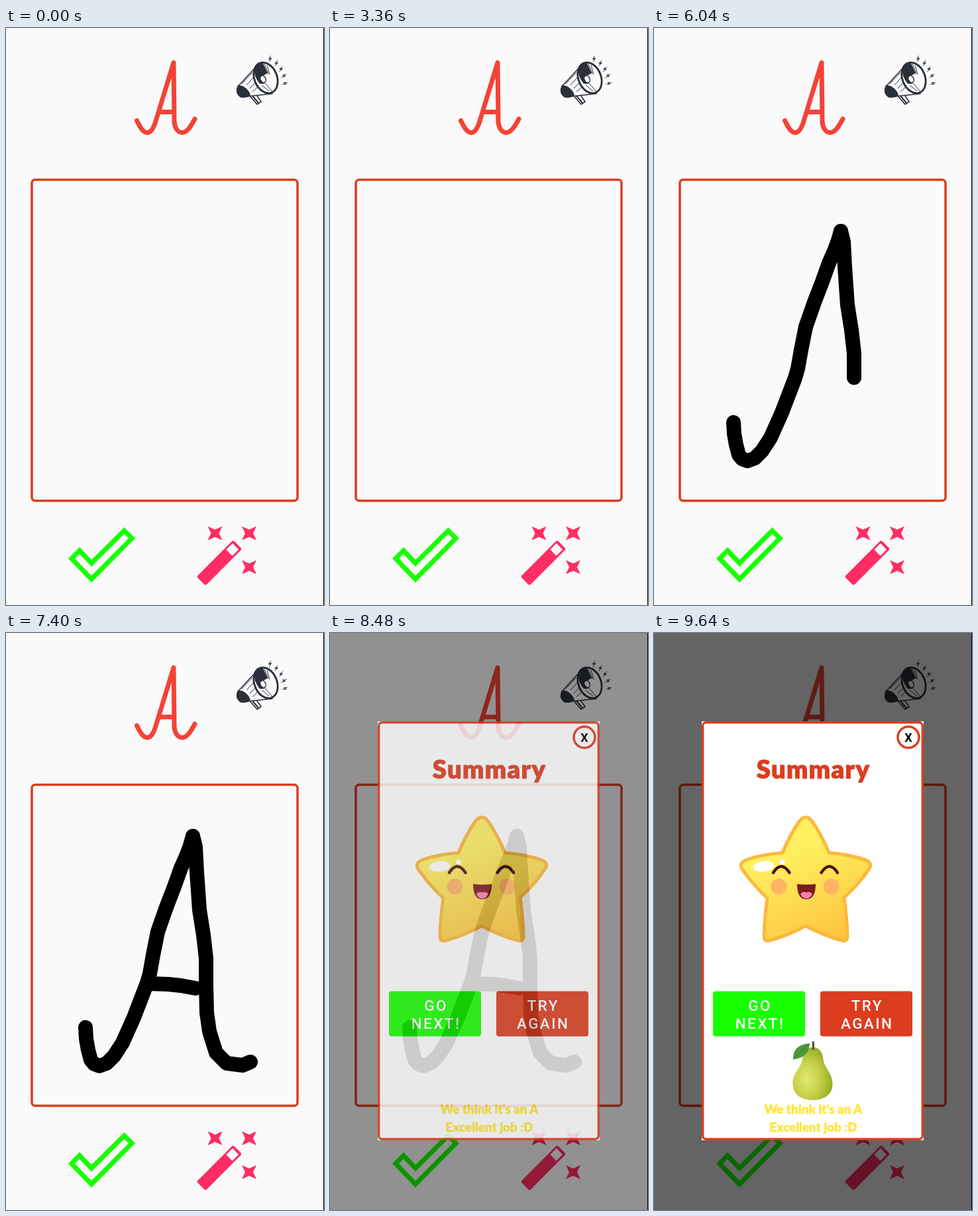
Write an HTML page that moves like this. It is 480 by 869 pixels and loops after 10000 ms.

```html
<!DOCTYPE html>
<html lang="en">
<head>
<meta charset="utf-8">
<title>Letter practice</title>
<style>
  html, body { margin: 0; width: 100%; height: 100%; overflow: hidden; background: #fafafa; }
  svg { display: block; width: 100%; height: 100%; }

  /* Every animation shares one 10 s loop, so 1% is 100 ms. */
  .ink path, .press, .shade, .dialog, .pear { animation: 10s linear infinite both; }
  .ink path {
    fill: none; stroke: #000; stroke-width: 22;
    stroke-linecap: round; stroke-linejoin: round; stroke-dasharray: 1 1.1;
  }
  .ink .bowl { animation-name: bowl; }
  .ink .tail { animation-name: tail; }
  .ink .rise { animation-name: rise; }
  .ink .fall { animation-name: fall; }
  .ink .bar { animation-name: bar; }
  .press.wand { animation-name: press-wand; }
  .press.check { animation-name: press-check; }
  .shade { animation-name: shade; }
  .dialog { animation-name: dialog; }
  .pear { animation-name: pear; }

  @keyframes bowl {
    0%, 7.19% { opacity: 0; stroke-dashoffset: 1; }
    7.2% { opacity: 1; stroke-dashoffset: .96; }
    15.6%, 33.59% { opacity: 1; stroke-dashoffset: 0; }
    33.6%, 100% { opacity: 0; stroke-dashoffset: 0; }
  }
  @keyframes tail {
    0%, 20.79% { opacity: 0; stroke-dashoffset: 1; }
    20.8% { opacity: 1; stroke-dashoffset: .95; }
    24.4%, 33.59% { opacity: 1; stroke-dashoffset: 0; }
    33.6%, 100% { opacity: 0; stroke-dashoffset: 0; }
  }
  @keyframes rise {
    0%, 45.59% { opacity: 0; stroke-dashoffset: 1; }
    45.6% { opacity: 1; stroke-dashoffset: .99; }
    50.4%, 50.79% { opacity: 1; stroke-dashoffset: .52; }
    55.6%, 100% { opacity: 1; stroke-dashoffset: 0; }
  }
  @keyframes fall {
    0%, 56.39% { opacity: 0; stroke-dashoffset: 1; }
    56.4% { opacity: 1; stroke-dashoffset: .97; }
    63.6%, 100% { opacity: 1; stroke-dashoffset: 0; }
  }
  @keyframes bar {
    0%, 69.99% { opacity: 0; stroke-dashoffset: 1; }
    70% { opacity: 1; stroke-dashoffset: .95; }
    74%, 100% { opacity: 1; stroke-dashoffset: 0; }
  }
  @keyframes press-wand {
    0%, 32.39% { opacity: 0; }
    32.4%, 33.59% { opacity: .05; }
    33.6%, 100% { opacity: 0; }
  }
  @keyframes press-check {
    0%, 79.59% { opacity: 0; }
    79.6%, 82.39% { opacity: .05; }
    82.4%, 100% { opacity: 0; }
  }
  @keyframes shade {
    0%, 83.99% { opacity: 0; }
    84%, 84.3% { opacity: .14; }
    84.8% { opacity: .42; }
    85.4%, 100% { opacity: .6; }
  }
  @keyframes dialog {
    0%, 83.99% { opacity: 0; }
    84%, 84.3% { opacity: .41; }
    84.8% { opacity: .8; }
    85.4%, 100% { opacity: 1; }
  }
  @keyframes pear {
    0%, 85.3% { opacity: 0; }
    85.6%, 85.9% { opacity: .07; }
    88%, 100% { opacity: 1; }
  }

  text { text-anchor: middle; }
  .fun { font-family: Lato, "Open Sans", sans-serif; font-weight: 900; stroke-linejoin: round; }
  .title { font-size: 38px; letter-spacing: 1.4px; fill: #dc3d1e; stroke: #dc3d1e; }
  .praise { font-size: 18.8px; fill: #ffe63c; stroke: #ffe63c; stroke-width: .4; }
  .label { font: 500 22.5px Roboto, sans-serif; letter-spacing: 2.4px; fill: #fff; }
  .close { font: 700 18px Roboto, sans-serif; }
</style>
</head>
<body>
<svg viewBox="0 0 480 869" preserveAspectRatio="none">
  <defs>
    <linearGradient id="gold" x1=".3" y1="0" x2=".75" y2="1">
      <stop offset=".25" stop-color="#fff062"/>
      <stop offset="1" stop-color="#fdc43c"/>
    </linearGradient>
    <radialGradient id="skin" cx=".35" cy=".6" r=".7">
      <stop offset="0" stop-color="#e3e86f"/>
      <stop offset=".5" stop-color="#c3d048"/>
      <stop offset="1" stop-color="#8ea51c"/>
    </radialGradient>
    <path id="spark" d="M-11-10.5L0-5.5 11-10.5 6 0 11 10.5 0 5.5-11 10.5-6 0Z"/>
    <path id="bolt" d="M2-6L-3 1 0 .5-2 6 3-1.500 0-1Z"/>
  </defs>

  <rect width="480" height="869" fill="#fafafa"/>

  <!-- model letter -->
  <path d="M197.500 139.500C202 149 207 157.500 213 157.500C220 157.500 224 148 227 137L253 52L254 141C254.500 150 259 157.500 266 157.500C274 157.500 280 146 285 137M232 126.500H254"
    fill="none" stroke="#f44336" stroke-width="7" stroke-linecap="round" stroke-linejoin="round"/>

  <!-- megaphone -->
  <g fill="#2a303a" stroke="#2a303a" stroke-linejoin="round">
    <path d="M367 101L379 115 385 111 376 98Z" fill="#fafafa" stroke-width="1.600"/>
    <path d="M371 101L381 113" fill="none" stroke-width="2"/>
    <path d="M375 61L350 88Q346 98 354 104L402 99Z" fill="#fafafa" stroke-width="1.500"/>
    <path d="M350 87Q357 86 363 92T368 102Q358 107 352 102T350 87Z" stroke-width="1"/>
    <path d="M372 67L356 84M373 75L363 86M376 83L368 91M380 89L372 96" fill="none" stroke-width="1"/>
    <ellipse cx="392" cy="75" rx="17" ry="24" transform="rotate(-22 392 75)" fill="#fafafa" stroke-width="2.800"/>
    <path d="M375 59Q379 52 388 53L395 68 386 73 390 84 383 84Q373 72 375 59Z" stroke="none"/>
    <path d="M390 54L396 69M394 56L398 70M386 86L397 95M391 83L402 96" fill="none" stroke-width="1"/>
    <ellipse cx="388" cy="77" rx="4" ry="5.500" transform="rotate(-25 388 77)" fill="#fafafa" stroke-width="1.500"/>
    <g stroke="none">
      <use href="#bolt" x="398.500" y="46.500"/>
      <use href="#bolt" transform="translate(408 53) rotate(15)"/>
      <use href="#bolt" transform="translate(415 62) rotate(20)"/>
      <use href="#bolt" transform="translate(419.500 72) rotate(45)"/>
      <use href="#bolt" transform="translate(421 83.500) rotate(65)"/>
    </g>
  </g>

  <rect x="39" y="228.500" width="401" height="483.500" rx="5" fill="none" stroke="#dc3d1e" stroke-width="3.500"/>

  <!-- buttons -->
  <path d="M99 799L111 787 129 806 178.500 757 190 768.500 129 830Z" fill="none" stroke="#18ff00" stroke-width="7.200"/>
  <g fill="#ff2d62">
    <rect x="-39" y="-9.500" width="78" height="19" rx="3" transform="translate(322 805.500) rotate(-45)"/>
    <path d="M332.500 785.500L342 776 351 785.500 341.500 795Z" fill="#fafafa"/>
    <use href="#spark" x="315.500" y="761"/>
    <use href="#spark" x="367" y="761"/>
    <use href="#spark" x="367" y="812"/>
  </g>
  <circle class="press check" cx="145" cy="793" r="53"/>
  <circle class="press wand" cx="333" cy="791" r="53"/>

  <!-- handwriting -->
  <g class="ink">
    <path class="bowl" pathLength="1" d="M253 425L238 414 222 412 205 416 187 428 175 447 170 467 169 486 177 512 187 525 205 539 222 545 242 546.500 262 543 284 527 294 509 305 487 305 467 301 453 288 432 275 421 262 419 252 423 235 426 222 434"/>
    <path class="tail" pathLength="1" d="M305 431L306 455 307 485 310 515 317 537 328 549 343 555 360 554"/>
    <path class="rise" pathLength="1" d="M120 594L121 611 124 628 128 643 133 649 141 652 152 648 163 637 176 617 193 579 213 527 217 513 222 485 229 450 242 413 254 382 264 354 272 336 278 320 282 306"/>
    <path class="fall" pathLength="1" d="M282 306L286 322 288 360 292 417 298 455 302 490 302 530 303 572 307 600 317 632 333 648 357 651 369 646"/>
    <path class="bar" pathLength="1" d="M216 528L245 529 264 531 286 535"/>
  </g>

  <rect class="shade" width="480" height="869"/>

  <g class="dialog">
    <rect x="72" y="133" width="335" height="631" fill="#fff"/>
    <rect x="73.700" y="134.700" width="331.600" height="627.600" rx="5" fill="none" stroke="#dc3d1e" stroke-width="3.400"/>
    <circle cx="384" cy="157" r="16" fill="#fff" stroke="#dc3d1e" stroke-width="3.500"/>
    <text class="close" x="384" y="163.500">X</text>
    <text class="fun title" x="240.500" y="219">Summary</text>

    <!-- star -->
    <path d="M219 284Q229 271 239 284Q254 306 264 331Q292 333 317 341Q332 346 324 356Q308 380 287 398Q291 426 292 456Q292 466 283 463Q254 455 229 441Q204 455 175 463Q166 466 166 456Q167 426 171 399Q150 380 134 357Q126 346 141 341Q166 333 194 331Q204 306 219 284Z"
      fill="url(#gold)" stroke="#fdb83c" stroke-width="5" stroke-linejoin="round"/>
    <g fill="#fff">
      <ellipse cx="165.500" cy="351.500" rx="16" ry="8" transform="rotate(-6 165 351)"/>
      <circle cx="194" cy="345" r="4"/>
    </g>
    <path d="M180 361Q192 342 204.500 361M252.500 361Q265 342 277 361" fill="none" stroke="#4b1411" stroke-width="4.500" stroke-linecap="round"/>
    <g fill="#ffb463">
      <circle cx="188.500" cy="382" r="12"/>
      <circle cx="268" cy="382" r="12"/>
    </g>
    <path d="M216 378Q230 380 244 378Q244 401 230 401T216 378Z" fill="#7a1b22"/>
    <path d="M221 393Q225 388 230 391Q235 388 239 393Q236 400 230 400T221 393Z" fill="#ff80ae"/>

    <rect x="89" y="539.500" width="139" height="68" rx="4" fill="#18ff00"/>
    <rect x="251" y="539.500" width="139" height="68" rx="4" fill="#dc3d1e"/>
    <g class="label">
      <text x="160" y="569">GO</text>
      <text x="160" y="596">NEXT!</text>
      <text x="321.700" y="569">TRY</text>
      <text x="321.700" y="596">AGAIN</text>
    </g>

    <g class="pear">
      <path d="M240 624C250 624 255 632 256 644C257 655 269.500 662 269.500 680C269.500 695 256 703.500 240 703.500C222 703.500 209.500 695 209.500 678C209.500 662 222 655 224 642C225 632 230 624 240 624Z" fill="url(#skin)"/>
      <path d="M240 628Q241 621 240 615" fill="none" stroke="#5b4a2c" stroke-width="3"/>
      <path d="M210 642Q209 620 235 618Q234 640 210 642Z" fill="#4f9a3c"/>
      <path d="M210 642Q221 632 234 619" fill="none" stroke="#2f6e28"/>
    </g>

    <g class="fun praise">
      <text x="240.500" y="724">We think it's an A</text>
      <text x="240.500" y="751">Excellent job :D</text>
    </g>
  </g>

  <rect x="479" width="1" height="869"/>
</svg>
</body>
</html>
```
